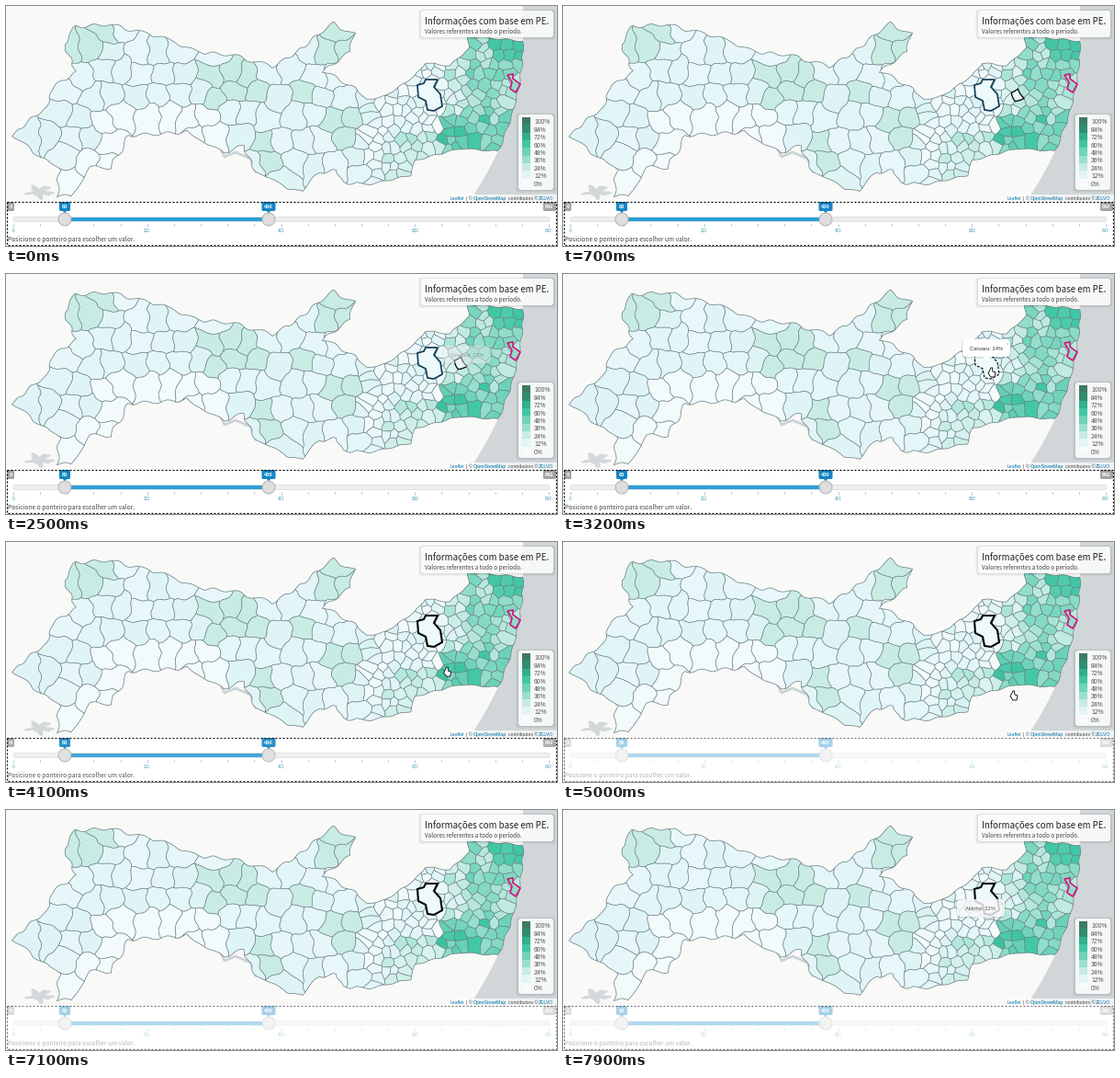
These frames come from a looping animation (600x261 px, 8 s). A matplotlib script:

```python
import numpy as np
import matplotlib.pyplot as plt
from matplotlib.animation import FuncAnimation
from matplotlib.collections import PolyCollection
from matplotlib.colors import LinearSegmentedColormap
from matplotlib.patches import Circle, FancyBboxPatch, Polygon, Rectangle
from matplotlib.path import Path

W, H, DPI = 600, 261, 100
FRAMES, STEP = 80, 100
PT = 72 / DPI
NOTO, ARIAL = "Noto Sans CJK JP", "Liberation Sans"
LINE, BLUE, GREY = "#647a80", "#1486c4", "#a3a3a3"
rng = np.random.default_rng(12)

fig = plt.figure(figsize=(W / DPI, H / DPI), dpi=DPI, facecolor="white")
ax = fig.add_axes([0, 0, 1, 1])
ax.set_xlim(0, W)
ax.set_ylim(H, 0)
ax.axis("off")

ramp = LinearSegmentedColormap.from_list("teal", [
    "#f6fcfc", "#e2f5f8", "#c8ece3", "#9be0ce", "#70d3ba",
    "#41c7a5", "#30b18e", "#318f70", "#3f7a63"])


def add(patch, z=1):
    patch.set_zorder(z)
    return ax.add_patch(patch)


def rect(x0, y0, x1, y1, z=1, **kw):
    return add(Rectangle((x0, y0), x1 - x0, y1 - y0, **kw), z)


def rounded(x0, y0, x1, y1, r=2.5, z=1, **kw):
    style = f"round,pad=0,rounding_size={r}"
    return add(FancyBboxPatch((x0, y0), x1 - x0, y1 - y0, boxstyle=style, **kw), z)


def shape(pts, z=1, **kw):
    return add(Polygon(pts, **kw), z)


def label(x, y, s, px, color="#333333", font=NOTO, ha="left", z=12):
    return ax.text(x, y, s, fontsize=px * PT, color=color, family=font,
                   ha=ha, va="center_baseline", zorder=z)


# ---------- map geometry ----------
def coast(y):
    return 563 - 58 * (np.clip(y - 40, 0, None) / 172) ** 2


def crooked(poly):
    """Split the edges and bend them with one shared field."""
    pts = []
    for a, b in zip(poly, np.roll(poly, -1, axis=0)):
        n = max(1, int(np.hypot(*(b - a)) / 3))
        pts += [a + (b - a) * k / n for k in range(n)]
    x, y = np.array(pts).T
    amp = np.where(x < 385, 1.7, 0.8)
    return np.c_[x + amp * np.sin(y / 3.1 + x / 9), y + amp * np.sin(x / 3.7 - y / 8)]


def clip_half(poly, mid, n):
    """Keep the part of poly on the negative side of a line."""
    out = []
    d = [(p - mid) @ n for p in poly]
    for i, p in enumerate(poly):
        q, a, b = poly[i - 1], d[i - 1], d[i]
        if (a < 0) != (b < 0):
            out.append(q + (p - q) * a / (a - b))
        if b < 0:
            out.append(p)
    return out


def cell(i):
    p = sites[i]
    poly = [p + np.array(c) * 70.0 for c in ((-1, -1), (1, -1), (1, 1), (-1, 1))]
    order = np.argsort(((sites - p) ** 2).sum(1))[1:40]
    for q in sites[order]:
        poly = clip_half(poly, (p + q) / 2, q - p)
    return crooked(np.array(poly))


def nearest(x, y):
    return int(np.argmin(((sites - (x, y)) ** 2).sum(1)))


def scatter(x0, x1, dx, dy, jitter):
    """Staggered grid with random offsets, kept inside the state."""
    pts = np.array([(x + dx / 2 * (j % 2), y)
                    for j, y in enumerate(np.arange(24, 210, dy))
                    for x in np.arange(x0, x1, dx)])
    pts += rng.uniform(-jitter, jitter, pts.shape)
    return pts[Path(border).contains_points(pts)]


def level(x, y):
    """Share of cases: mint patches in the west, rising towards the coast."""
    r = rng.random()
    if x < 390:
        if any(np.hypot(x - a, y - b) < d for a, b, d in patches):
            return 0.25
        white = 100 < x < 235 and y > 104 or y > 168 and x < 100
        return 0.03 if white else 0.09 + 0.06 * r
    if np.hypot(x - 510, y - 110) < 7:
        return 0.8
    if y < 62 and x > 530 or y > 122 and 476 < x < 532:
        return 0.38 + 0.28 * r
    if x > 496:
        return 0.27 + 0.25 * r ** 1.5
    if x > 478:
        return 0.14 + 0.2 * r
    if y > 140 and x > 408:
        return 0.12 + 0.28 * r ** 1.5
    return 0.02 + 0.14 * r


north = [(5, 141), (44, 111), (52, 86), (76, 72), (63, 43), (75, 23), (112, 20),
         (173, 35), (208, 50), (245, 53), (290, 66), (331, 40), (355, 18),
         (379, 31), (374, 48), (346, 72), (376, 86), (392, 102), (412, 98),
         (446, 76), (456, 62), (484, 65), (504, 46), (503, 33)]
south = [(495, 155), (446, 168), (440, 184), (396, 194), (366, 192), (360, 179),
         (340, 181), (322, 203), (298, 194), (272, 179), (258, 151), (236, 160),
         (198, 137), (134, 141), (114, 176), (92, 175), (72, 207), (56, 206),
         (58, 178), (22, 152)]
shore = [(coast(y), y) for y in range(38, 160, 8)]
border = crooked(np.array(north + shore + south, float))
# centre and radius
patches = [(78, 42, 18), (104, 38, 14), (246, 80, 31), (318, 92, 17),
           (358, 38, 23), (363, 131, 20), (286, 160, 15)]

sites = np.vstack([scatter(14, 388, 23, 24, 6.5), scatter(395, 566, 11.5, 10, 3.8)])

rect(0, 0, W, 212, 0, fc="#f9f9f7", lw=0)
ys = np.arange(0, 213, 4)
shape(list(zip(coast(ys), ys)) + [(W, 212), (W, 0)], 0.5, fc="#d1d6d9", lw=0)
a = np.linspace(0, 2 * np.pi, 60)
arm = 1 + 0.35 * np.sin(5 * a) + 0.2 * np.sin(9 * a + 1)
shape(np.c_[37 + 12 * arm * np.cos(a), 202 + 6 * arm * np.sin(a)], 0.5, fc="#d3d8da", lw=0)
ax.plot([232, 238, 250, 266, 272], [152, 164, 159, 166, 180],
        color="#ccd3d6", lw=2, zorder=0.6)

cells = PolyCollection([cell(i) for i in range(len(sites))],
                       facecolors=ramp([level(*p) for p in sites]),
                       edgecolors=LINE, linewidths=0.42, zorder=2)
ax.add_collection(cells, autolim=False)
cells.set_clip_path(shape(border, 3, fill=False, ec=LINE, lw=0.5))

recife = [(546, 75), (552, 74), (552, 79), (560, 85), (555, 94), (549, 90), (551, 83)]
shape(recife, 5, fc=ramp(0.4), ec="#d6127d", lw=1.2)
caruaru = [(448, 86), (455, 84), (457, 80), (470, 80), (466, 88), (473, 96),
           (475, 109), (466, 114), (459, 113), (457, 103), (449, 99)]
city = shape(caruaru, 5, fc=ramp(0.06))


def hover(t0, t1, x, y):
    i = nearest(x, y)
    return t0, t1, shape(cell(i), 4.5, fc=ramp(0.05), ec="black", lw=0.9)


hovers = [hover(700, 1100, 494, 102), hover(1100, 1900, 477, 123),
          hover(2100, 2600, 494, 102), hover(6300, 6900, 474, 69)]


# ---------- map controls ----------
def card(x0, y0, x1, y1):
    for k in (3, 2, 1):
        rounded(x0 - k, y0 - k / 2, x1 + k, y1 + k, 4, 10, fc="black", alpha=0.035, lw=0)
    rounded(x0, y0, x1, y1, 3, 11, fc="white", alpha=0.88, lw=0)


card(452, 5, 596, 34)
card(558, 118, 596, 200)
label(456, 15.3, "Informações com base em PE.", 9.7, "#222222")
label(456, 27.3, "Valores referentes a todo o período.", 6.3, "#444444")
ax.imshow(np.linspace(1, 0, 9)[:, None], cmap=ramp, extent=(562, 571, 196, 121),
          aspect="auto", zorder=12, interpolation="nearest")
for k, v in enumerate((100, 84, 72, 60, 48, 36, 24, 12, 0)):
    label(575, 126 + 8.4 * k, f"{v}%", 6.8, "#555555", ARIAL)

rect(482, 204.5, W, 212, 10, fc="white", alpha=0.7, lw=0)
x = 484
for k, s in enumerate(("Leaflet", "| ©", "OpenStreetMap", "contributors ©", "ZELVO")):
    note = label(x, 208.6, s, 5.1, "#444444" if k % 2 else "#0078a8", ARIAL)
    x += note.get_window_extent().width + 1.4

# ---------- slider panel ----------
rect(0, 212, W, H, 10, fc="white", lw=0)
rounded(8, 229.5, 592, 234.5, 2, 11, fc="#eeeeee", ec="#cfcfcf", lw=0.4)
rect(64, 230, 286, 234, 11.2, fc="#2c9ed8", lw=0)
for x, s, half, c in ((5, "0", 4, GREY), (64, "80", 6, BLUE),
                      (286, "400", 7.5, BLUE), (592, "842", 7, GREY)):
    rounded(x - half, 213, x + half, 223, 1.5, 12, fc=c, lw=0)
    label(x, 218.3, s, 5.8, "white", ARIAL, "center", 13).set_weight("bold")
for x in (64, 286):
    shape([(x - 2, 223), (x + 2, 223), (x, 225.5)], 12, fc=BLUE, lw=0)
    add(Circle((x, 232), 7, fc="#dedede", ec="#aaaaaa", lw=0.6), 13)
for k in range(21):
    x = 8 + 583 * k / 20
    ax.plot([x, x], [236.5, 240 if k % 5 == 0 else 238.5], color="#8fbcc8", lw=0.5, zorder=12)
for k in range(5):
    label(8 + 145.75 * k, 243.7, str(int(210.6 * k + 0.5)), 4.6, "#3a9ab0", ARIAL, "center")
label(2, 252.5, "Posicione o ponteiro para escolher um valor.", 6.6, "#444444")
veil = rect(0, 212, W, H, 14, fc="white", lw=0, alpha=0)
frame = rect(1, 212.5, 598.5, 259.5, 15, fill=False, ec="black", lw=0.9, ls=(0, (1.6, 1.6)))


# ---------- popups and pointer ----------
def popup(t0, t1, x, y, text):
    """Bubble centred on x with its top at y."""
    half = 26
    tip = [(x - 4.5, y + 18.5), (x + 4.5, y + 18.5), (x, y + 24)]
    parts = [
        (rounded(x - half - 1, y, x + half + 1, y + 20.5, 5, 7, fc="black", lw=0), 0.12),
        (shape(tip, 8, fc="white", lw=0), 1),
        (rounded(x - half, y, x + half, y + 19, 4.5, 8, fc="white", lw=0), 1),
        (label(x, y + 9.8, text, 5.9, "#333333", ARIAL, "center", 9), 1),
        (label(x + half - 4, y + 4.2, "×", 6, "#b5b5b5", ARIAL, "center", 9), 1),
    ]
    return t0, t1, parts


popups = [
    popup(700, 1250, 494, 76, "Gravatá: 27%"),
    popup(1100, 1640, 481, 73, "Bezerros: 19%"),
    popup(2150, 2580, 502, 78, "Gravatá: 27%"),
    popup(2850, 3500, 461, 71, "Caruaru: 14%"),
    popup(7740, 9000, 455, 97, "Altinho: 22%"),
]

hand_pts = np.array([(-1, -5), (0.6, -5), (0.8, -1), (4, 0), (3, 5), (-1, 5), (-4, 1)])
hand = shape(hand_pts, 16, fc="white", ec="black", lw=0.6, joinstyle="round")


def ease(t, t0, t1):
    u = np.clip((t - t0) / (t1 - t0), 0, 1)
    return u * u * (3 - 2 * u)


def update(i):
    t = i * STEP
    inside = 2900 <= t < 3500
    city.set_edgecolor("#123f5a" if t < 2900 else "black")
    city.set_linewidth(0.8 if inside else 1.25 if t < 2900 else 1.5)
    city.set_linestyle((0, (2.5, 1.5)) if inside else "-")
    for t0, t1, patch in hovers:
        patch.set_visible(t0 <= t < t1)
    for t0, t1, parts in popups:
        fade = float(np.clip(min(t - t0, t1 - t) / 200, 0, 1))
        for art, strength in parts:
            art.set_alpha(fade * strength)
    hand.set_visible(2800 <= t < 5400)
    u = ease(t, 3500, 4600)
    hand.set_xy(hand_pts + (467 + 24 * u, 107 + 60 * u))
    dim = ease(t, 4000, 4400)
    veil.set_alpha(0.62 * dim)
    frame.set_alpha(1 - 0.45 * dim)
    return []


anim = FuncAnimation(fig, update, frames=FRAMES, interval=STEP, repeat=True,
                     repeat_delay=0, blit=False)
plt.show()
```
